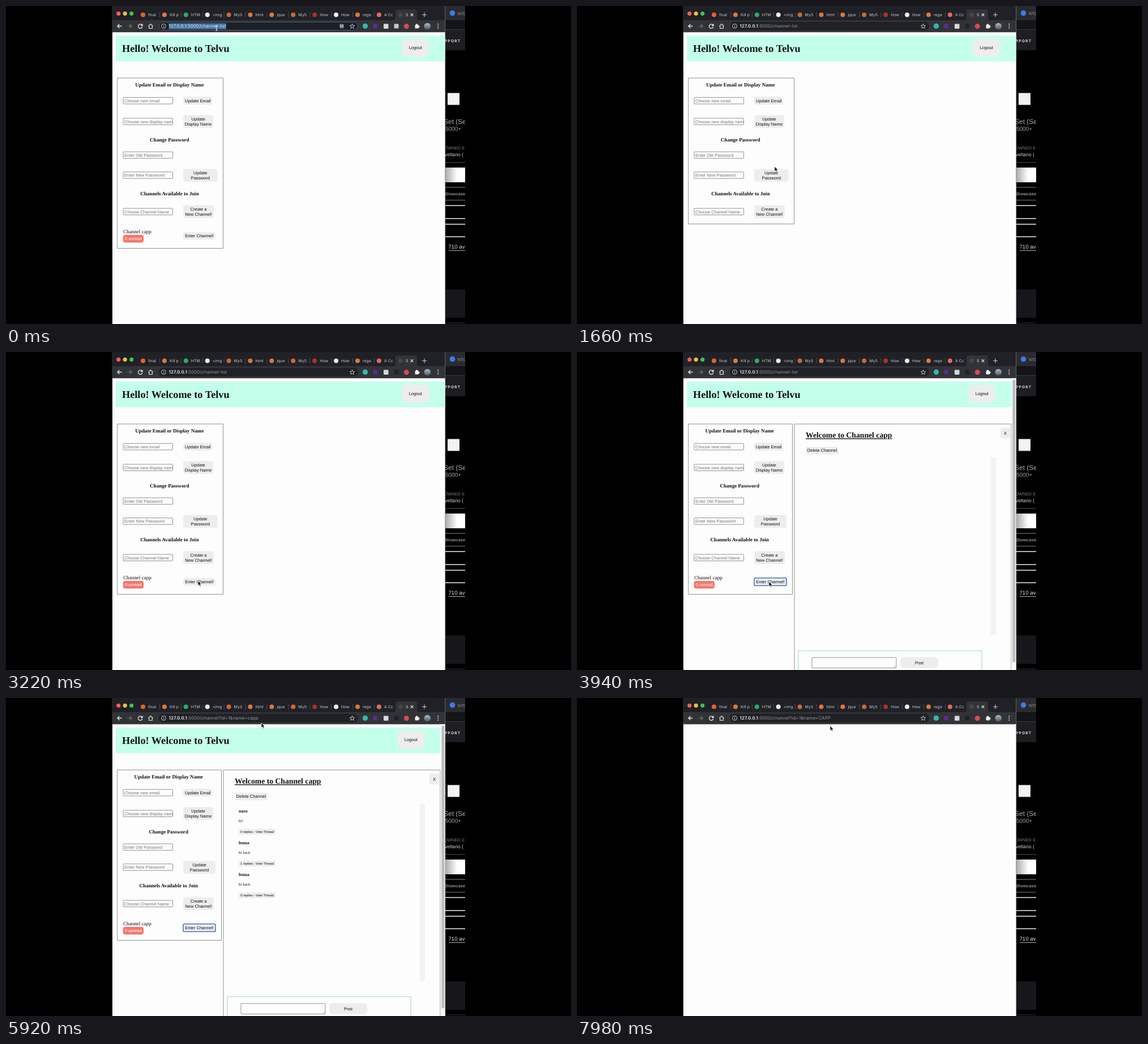
Write an HTML page that moves like this. It is 998 px wide and 561 px high and loops after 8 s.

```html
<!DOCTYPE html>
<html lang="en">
<head>
<meta charset="utf-8">
<title>Channel list</title>
<style>
  html, body { margin: 0; width: 100%; height: 100%; overflow: hidden; background: #000; }
  svg { display: block; width: 100vw; height: 100vh; }
  text { font: 7.6px "Liberation Sans", Arial, sans-serif; text-rendering: geometricPrecision; white-space: pre; }
  .serif { font-family: "Liberation Serif", Times, serif; }
  .ui { font-family: Inter, Roboto, sans-serif; }
  .bold { font-weight: 700; }
  #url { font-size: 7.8px; letter-spacing: .15px; }
  #host { font-weight: 600; }
</style>
</head>
<body>
<svg viewBox="0 0 998 561" preserveAspectRatio="none">
  <defs>
    <clipPath id="stage"><rect x="187" width="624" height="561"/></clipPath>
    <linearGradient id="shine"><stop stop-color="#aaa"/><stop offset=".6" stop-color="#fff"/></linearGradient>
    <linearGradient id="photo" x2="0" y2="1"><stop stop-color="#a9bed0"/><stop offset="1" stop-color="#4b5b62"/></linearGradient>
  </defs>
  <rect width="998" height="561"/>
  <g clip-path="url(#stage)">
    <g id="backdrop"></g>
    <g id="browser"></g>
    <g id="focus">
      <rect x="270.5" y="28.5" width="351" height="14" rx="7" fill="#1d1f22" stroke="#35638f"/>
      <rect id="selection" x="287.5" y="30.5" height="10.5" fill="#44739f"/>
      <path d="M590 32.5h2v2h-2zM594 32.5h2v2h-2zM590 36.5h2v2h-2zM594 36.5h2v2h-2zM589 35.5h8M593 31.5v8" fill="none" stroke="#c6c8cb" stroke-width=".8"/>
    </g>
    <g id="addressIcons"></g>
    <text id="url" class="ui" x="287.5" y="38.4"><tspan id="host">127.0.0.1</tspan><tspan id="path"></tspan></text>
    <path id="reload" fill="none" stroke="#e4e5e7" stroke-width="1.3"/>
    <g id="tabIcon"></g>
    <rect id="extension" x="685.5" y="31.5" width="8" height="8" rx="1"/>
    <g id="page"></g>
    <path id="arrow" d="M0 0V8.6L2 6.8L3.5 10L5 9.3L3.6 6.2H6.2Z" fill="#111" stroke="#fff" stroke-width=".7"/>
    <path id="beam" d="M-2-4.5Q0-4.5 0-3V3Q0 4.5-2 4.5M2-4.5Q0-4.5 0-3V3Q0 4.5 2 4.5" fill="none" stroke="#dde3e8" stroke-width="1.1"/>
  </g>
</svg>
<script>
const LOOP = 8000;
const el = id => document.getElementById(id);

const rect = (x, y, w, h, fill, more = '') =>
  `<rect x="${x}" y="${y}" width="${w}" height="${h}" fill="${fill}" ${more}/>`;
const frame = (x, y, w, h, stroke = '#777', rx = 0) =>
  rect(x, y, w, h, 'none', `stroke="${stroke}" stroke-width=".8" rx="${rx}"`);
const dot = (x, y, r, fill) => `<circle cx="${x}" cy="${y}" r="${r}" fill="${fill}"/>`;
const line = (d, stroke, width = 1) => `<path d="${d}" fill="none" stroke="${stroke}" stroke-width="${width}"/>`;
const text = (x, y, label, { size = 7.6, fill = '#111', cls = '', mid = false, more = '' } = {}) =>
  `<text x="${x}" y="${y}" class="${cls}" fill="${fill}" style="font-size:${size}px" ${mid ? 'text-anchor="middle"' : ''} ${more}>${label}</text>`;

function button(x, y, w, h, label, { size = 7.6, rx = 4, focused = false } = {}) {
  const lines = label.split('|');
  const base = y + h / 2 + size * .35 - (lines.length - 1) * 4.3;
  return rect(x, y, w, h, '#ededee', `rx="${focused ? 2 : rx}" ${focused ? 'stroke="#2459b8" stroke-width="1.3"' : ''}`) +
    lines.map((s, i) => text(x + w / 2, base + i * 8.6, s, { size, mid: true })).join('');
}

const input = (y, hint) => frame(207, y, 87.5, 11.5, '#777', 1) +
  text(209, y + 8.7, hint, { fill: '#757575' });
const heading = (x, y, label) => text(x, y, label, { size: 9.12, cls: 'serif bold', mid: true });

function drawBackdrop() {
  const hair = (y, color, width) => line(`M776 ${y}H811`, color, width);
  return rect(775, 0, 36, 25, '#2a2b30') + rect(775, 25, 36, 17, '#141518') +
    rect(775, 42, 36, 36, '#1d1d22') + hair(41.5, '#3a3a40') +
    dot(788.5, 12.5, 4.8, '#3d7bea') +
    text(798, 15.5, 'NTD', { size: 7, fill: '#9a9ca2', cls: 'ui' }) +
    text(775, 63.7, 'PPORT', { size: 6.6, fill: '#ddd', cls: 'ui bold', more: 'letter-spacing="1.2"' }) +
    rect(780, 153.5, 21, 21, '#f2f2f2') +
    text(773, 207.5, 'Set (Se', { size: 12, fill: '#a8a8a8' }) +
    text(776, 220, '5000+', { size: 10, fill: '#a0a0a0' }) +
    text(774, 253, 'OWNED E', { size: 7.6, fill: '#77797c' }) +
    text(775, 265, 'veltano (', { size: 8.6, fill: '#d5d5d5' }) +
    hair(276, '#555') + rect(776, 285, 35, 26, 'url(#shine)') +
    hair(320, '#888') + hair(342.5, '#777') +
    text(774, 334, 'Showcase', { fill: '#8d8d8d', cls: 'bold' }) +
    [352, 375, 385, 407].map(y => hair(y, '#eee', 1.6)).join('') +
    text(781.5, 427.5, '710 ava', { size: 9.6, fill: '#ddd' }) + line('M782 431.5H811', '#aaa') +
    rect(776, 500, 35, 50, '#17171b') + hair(559, '#333');
}

function drawBrowser() {
  const tabs = [['final', '#e2622f'], ['Kill p', '#d97745'], ['HTM', '#2fa866'], ['&lt;img', '#eee'],
    ['MyS', '#c9683c'], ['html', '#d97745'], ['jque', '#d97745'], ['MyS', '#c9683c'],
    ['How', '#a8322c'], ['How', '#eee'], ['rege', '#d97745'], ['A Cc', '#e36a5c']];
  return rect(187, 0, 589, 561, '#202126') + rect(188, 25, 587.5, 21.3, '#323337') +
    ['#f25e57', '#f4bd3f', '#3fc24c'].map((c, i) => dot(198.7 + i * 11.5, 13.3, 3.6, c)).join('') +
    tabs.map(([label, color], i) => {
      const x = 242 + i * 37.9;
      return dot(x, 15.5, 4, color) + text(x + 9, 18, label, { size: 7, fill: '#c5c7cb', cls: 'ui' }) +
        line(`M${x + 29.5} 11v9`, '#55575c', .8);
    }).join('') +
    `<path d="M685 25Q688 25 688 21V10Q688 6 692 6H722Q726 6 726 10V21Q726 25 729 25Z" fill="#323337"/>` +
    text(706, 18, 'S', { size: 7, fill: '#ddd', cls: 'ui' }) +
    line('M714.7 13.2l4.6 4.6m0-4.6l-4.6 4.6', '#eee', 1.2) + line('M735 15.5h8M739 11.5v8', '#ccc', 1.1) +
    line('M204.5 35.5h-7.5m3.4-3.5l-3.5 3.5l3.5 3.5', '#e4e5e7', 1.3) +
    line('M214.5 35.5h7.5m-3.4-3.5l3.5 3.5l-3.5 3.5', '#74767a', 1.2) +
    line('M251.5 35.5l4-3.7l4 3.7M252.7 35v4.5h5.6v-4.5', '#e4e5e7', 1.2) +
    rect(270, 28, 352, 15, '#202125', 'rx="7.5"') +
    dot(634.5, 35.5, 4.7, '#33b8aa') + rect(648.5, 31.5, 7, 8, '#5b2b96') +
    rect(667, 31.5, 8.5, 8.5, '#d5d7da', 'rx="1"') + dot(707.3, 35.7, 4.5, '#d94a55') +
    rect(722.5, 33, 6.5, 6.5, '#eceded', 'rx="1"') + dot(725.5, 32.7, 1.5, '#eceded') + dot(729.2, 36.2, 1.5, '#eceded') +
    dot(744.3, 35.7, 5.8, 'url(#photo)') + [32, 35.5, 39].map(y => dot(763.3, y, 1, '#ddd')).join('') +
    line('M775.7 0V561', '#77797c', .8);
}

const ADDRESS_ICONS = line('M278.5 35.5v2.3m0-4.3v1', '#ddd') +
  '<circle cx="278.5" cy="35.5" r="4" fill="none" stroke="#c9cbce"/>' +
  line('M611.5 31.5l1.2 2.8l3 .2l-2.3 1.9l.8 3l-2.7-1.7l-2.7 1.7l.8-3l-2.3-1.9l3-.2z', '#d4d6d8', .9);

function drawChannel(hasMessages) {
  const messages = [['naro', 'hi!', 0], ['lenna', 'hi back', 1], ['lenna', 'hi back', 0]];
  return frame(384, 127, 383, 450) +
    text(404, 151.3, 'Welcome to Channel capp', { size: 13.7, cls: 'serif bold', more: 'text-decoration="underline"' }) +
    button(404, 167, 58, 13.5, 'Delete Channel') + button(748, 133.5, 17, 19, 'X') +
    rect(730.5, 186, 9.5, 313, '#f3f3f5') +
    (hasMessages ? messages.map(([name, body, replies], i) => {
      const y = 202 + i * 56.2;
      return text(411, y, name, { size: 8, cls: 'serif bold' }) + text(411, y + 17, body, { size: 7, cls: 'serif' }) +
        button(411.5, y + 28.7, 64, 10, `${replies} replies - View Thread`, { size: 5.75, rx: 2 });
    }).join('') : '') +
    frame(391, 527, 324, 50, '#7fcfae') + frame(415, 539, 149, 18.5, '#777', 1) +
    line('M559.5 556.5l3.5-3.5m-1.5 3.5l1.5-1.5', '#888', .6) +
    button(571, 538.5, 67, 19, 'Post', { rx: 5 }) +
    rect(767.5, 46.3, 8, 515, '#f7f7f8') + rect(769.3, 48.5, 5, 499, '#bcbcbe', 'rx="2.5"');
}

function drawPage({ blank, listed, channel, messages, focused }) {
  const base = rect(188, 46.3, 587.5, 515, '#fdfdfd');
  if (blank) return base;
  const right = channel ? 380.5 : 383.5, center = channel ? 287.2 : 288.8;
  return base + rect(194, 52, channel ? 573.5 : 581.5, 45.5, '#c4ffeb') +
    text(205, 81, 'Hello! Welcome to Telvu', { size: 18.24, cls: 'serif bold' }) +
    button(channel ? 692 : 699, 57.7, channel ? 46.5 : 48.5, 32, 'Logout', { rx: 8 }) +
    frame(196.7, 127, right - 196.7, listed ? 300.5 : 257.5) +
    heading(center, 142.3, 'Update Email or Display Name') +
    input(161.3, 'Choose new email') + button(313, 160, 51.5, 14, 'Update Email') +
    `<svg x="0" y="0" width="294" height="561">${input(198, 'Choose new display name')}</svg>` +
    line('M294.5 198.5v10.5', '#777', .8) +
    button(313, 192.5, 53, 22.5, 'Update|Display Name') +
    heading(center, 239.3, 'Change Password') +
    input(257.2, 'Enter Old Password') + input(292.7, 'Enter New Password') +
    button(313, 287.5, channel ? 57 : 60.5, 22.5, 'Update|Password') +
    heading(center, 333.8, 'Channels Available to Join') +
    input(357, 'Choose Channel Name') + button(313, 351.5, 54, 22.5, 'Create a|New Channel!') +
    (listed ? text(207, 401, 'Channel capp', { size: 9.12, cls: 'serif' }) +
      rect(206.7, 403.7, 36.3, 13.5, '#f2776e', 'rx="4"') + text(209.8, 413, '0 unread', { fill: '#fff' }) +
      button(313, 398.7, 57, 13.5, 'Enter Channel!', { focused }) : '') +
    (channel ? drawChannel(messages) : '');
}

// Pointer stops: time, x, y
const STOPS = [[0, 372, 39], [560, 372, 39], [860, 363.5, 110], [1500, 350, 270], [2300, 340, 395], [2950, 340, 395],
  [3300, 339, 405], [4900, 339, 405], [5800, 451, 44], [6000, 451, 44], [6200, 450.3, 38], [7740, 450.3, 38],
  [7920, 447, 49], [8000, 447, 49]];

function pointerAt(t) {
  const i = STOPS.findIndex(s => s[0] > t);
  const [t0, x0, y0] = STOPS[i - 1], [t1, x1, y1] = STOPS[i];
  const k = (t - t0) / (t1 - t0), e = k * k * (3 - 2 * k);
  return [x0 + (x1 - x0) * e, y0 + (y1 - y0) * e];
}

function pathAt(t) {
  if (t < 4400) return ':5000/channel-list';
  const erased = Math.max(0, Math.min(4, Math.floor((t - 7000) / 60)));
  const typed = Math.max(0, Math.min(4, Math.floor((t - 7260) / 100)));
  return ':5000/channel?id=1&name=' + 'capp'.slice(0, 4 - erased) + 'CAPP'.slice(0, typed);
}

const show = (id, on) => el(id).style.display = on ? '' : 'none';
let pageKey;

function render(t) {
  const page = {
    blank: t >= 7800,
    listed: t < 1240 || t >= 2900,
    channel: t >= 3600,
    messages: t >= 4400,
    focused: t >= 3500 && t < 6300
  };
  const key = JSON.stringify(page);
  if (key !== pageKey) el('page').innerHTML = drawPage(page);
  pageKey = key;

  const selected = t < 840 || (t >= 6300 && t < 7000);
  const editing = selected || (t >= 7000 && t < 7740);
  const loading = (t >= 840 && t < 1240) || (t >= 7740 && t < 7840);
  el('path').textContent = pathAt(t);
  el('path').setAttribute('fill', editing ? '#e6eaee' : '#989ba0');
  el('host').setAttribute('fill', '#eef0f2');
  el('host').style.fontWeight = editing ? 400 : 600;
  show('focus', editing);
  show('selection', selected);
  el('selection').setAttribute('width', el('url').getComputedTextLength());
  el('reload').setAttribute('d', loading ? 'M234 32.3l6.4 6.4m0-6.4l-6.4 6.4'
    : 'M240.3 33.8A3.7 3.7 0 1 0 240.8 36.5M241 31.5V34.5H238');
  el('tabIcon').innerHTML = loading
    ? `<g transform="rotate(${(t - 860) * .36} 697 15.5)">${line('M697 11.5A4 4 0 0 1 697 19.5', '#e0e3e8', 1.3)}</g>`
    : dot(697, 15.5, 4, '#44464b');
  el('extension').setAttribute('fill', t < 840 ? '#c5c8c8' : '#222326');

  const beam = t < 620 || (t >= 6150 && t < 7780);
  const [x, y] = pointerAt(t);
  show('beam', beam);
  show('arrow', !beam);
  el(beam ? 'beam' : 'arrow').setAttribute('transform', `translate(${x} ${y})`);
}

el('backdrop').innerHTML = drawBackdrop();
el('browser').innerHTML = drawBrowser();
el('addressIcons').innerHTML = ADDRESS_ICONS;

const start = performance.now();
function tick() {
  render((performance.now() - start) % LOOP);
  requestAnimationFrame(tick);
}
tick();
</script>
</body>
</html>
```
